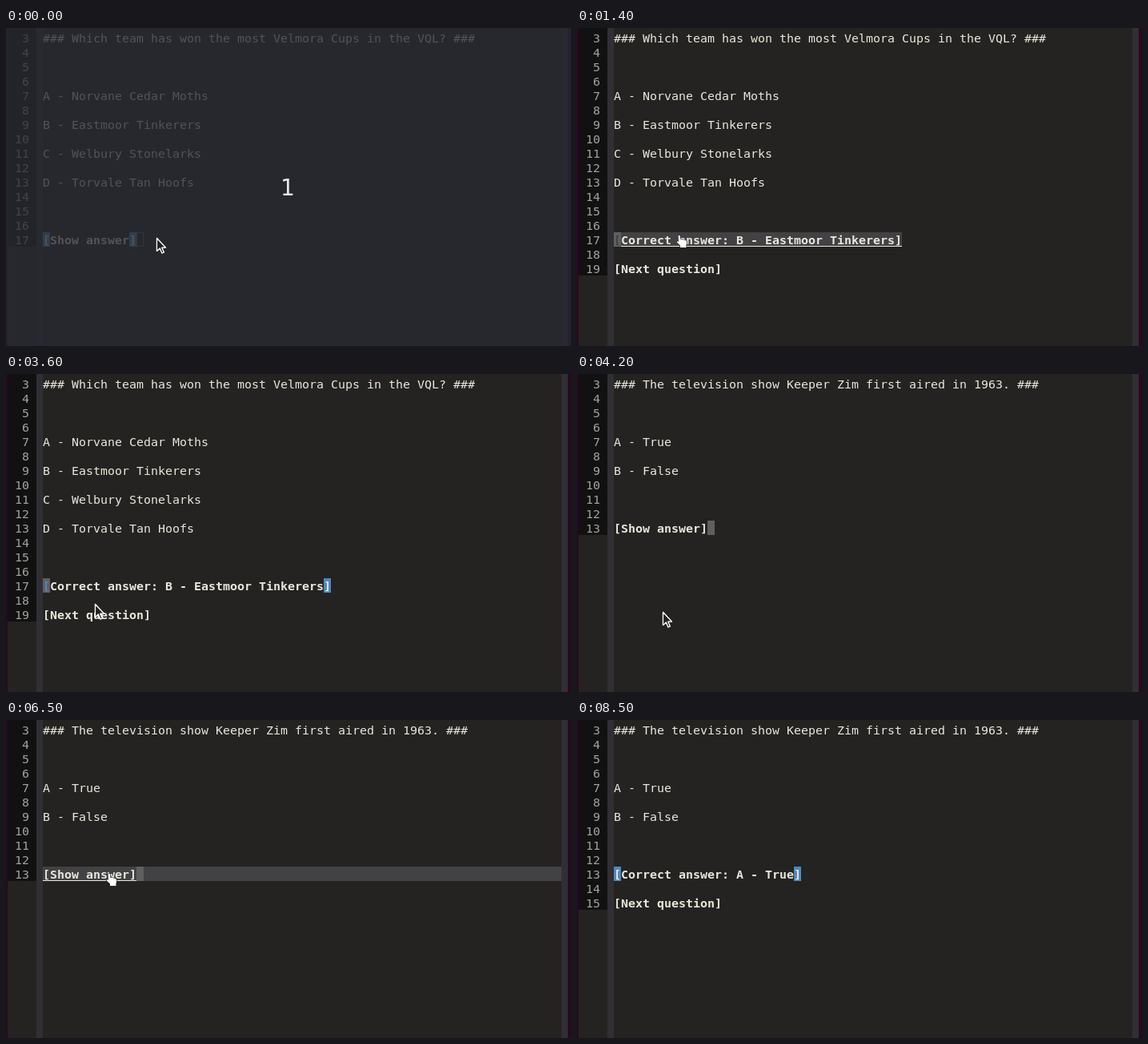
An HTML page with a canvas that plays this animation: 706x397 px, repeating every 8600 ms.

```html
<!DOCTYPE html>
<html lang="en">
<head>
<meta charset="utf-8">
<title>Quiz buffer</title>
<style>
  html, body { margin: 0; width: 100%; height: 100%; overflow: hidden; background: #242321; }
  canvas { display: block; width: 706px; height: 397px; }
</style>
</head>
<body>
<canvas id="stage"></canvas>
<script>
const W = 706, H = 397, LOOP = 8600, STEP = 100;
const CELL = 9, ROW = 18, LEFT = 46, RIGHT = 694, BASE = 15;
const FIRST_LINE = 3, FIRST_OPTION = 7;
const COUNTDOWN_END = 200, FOCUS = 1300, BLINK = 530, MATCH_DELAY = 200;
const MONO = '14.95px "DejaVu Sans Mono", monospace';
const C = {
  bg: '#242321', gutter: '#111112', fringe: '#302f33', edge: '#2a0822',
  text: '#e9e7dd', number: '#a3a39d', hover: '#424143', caret: '#5f5f62', paren: '#4d88c0'
};

const canvas = document.getElementById('stage');
const ctx = canvas.getContext('2d');
const ratio = window.devicePixelRatio || 1;
canvas.width = W * ratio;
canvas.height = H * ratio;
ctx.scale(ratio, ratio);

const hockey = {
  title: '### Which team has won the most Velmora Cups in the VQL? ###',
  options: ['A - Norvane Cedar Moths', 'B - Eastmoor Tinkerers',
            'C - Welbury Stonelarks', 'D - Torvale Tan Hoofs'],
  correct: 1
};
const television = {
  title: '### The television show Keeper Zim first aired in 1963. ###',
  options: ['A - True', 'B - False'],
  correct: 0
};

const screens = [
  { since: 0, quiz: hockey, answered: false },
  { since: FOCUS, quiz: hockey, answered: true },
  { since: 4200, quiz: television, answered: false },
  { since: 6800, quiz: television, answered: true }
];

// The pointer glides to each point between its two times and rests there.
const glides = [
  { from: 700, to: 1000, x: 124, y: 258 },
  { from: 3300, to: 3800, x: 107, y: 297 },
  { from: 4700, to: 5200, x: 125, y: 234 },
  { from: 5200, to: 5800, x: 125, y: 191 },
  { from: 7000, to: 7100, x: 120, y: 219 },
  { from: 7100, to: 7500, x: 122, y: 274 },
  { from: 7600, to: 8000, x: 8, y: 184 },
  { from: 8200, to: 8500, x: 20, y: -40 }
];

const rowTop = line => 3 + (line - FIRST_LINE) * ROW;
const colX = col => LEFT + col * CELL;
const easeOut = p => 1 - (1 - p) ** 1.5;

function pointerAt(t) {
  let x = 188, y = 262;
  for (const g of glides) {
    const p = easeOut(Math.min(1, Math.max(0, (t - g.from) / (g.to - g.from))));
    x += (g.x - x) * p;
    y += (g.y - y) * p;
  }
  return { x: Math.round(x), y: Math.round(y) };
}

function rect(x, y, w, h, color) {
  ctx.fillStyle = color;
  ctx.fillRect(x, y, w, h);
}

function write(text, x, line, color = C.text, bold = false) {
  ctx.font = (bold ? 'bold ' : '') + MONO;
  ctx.fillStyle = color;
  [...text].forEach((ch, i) => ctx.fillText(ch, x + i * CELL, rowTop(line) + BASE));
}

function drawFrame(lastLine) {
  rect(0, 0, W, H, C.bg);
  rect(2, 0, 36, rowTop(lastLine + 1), C.gutter);
  rect(38, 0, 8, H, C.fringe);
  rect(RIGHT, 0, 8, H, C.fringe);
  rect(0, 0, 2, H, C.edge);
  rect(702, 0, 4, H, C.edge);
  for (let n = FIRST_LINE; n <= lastLine; n++) {
    const label = String(n);
    write(label, 29 - label.length * CELL, n, C.number);
  }
}

function drawLink({ text, line, fullRow, underline }, hovered) {
  const y = rowTop(line);
  if (hovered) rect(LEFT, y, fullRow ? RIGHT - LEFT : text.length * CELL, ROW, C.hover);
  write(text, LEFT, line, C.text, true);
  if (hovered) rect(LEFT, y + 17, underline * CELL, 1, C.text);
}

function drawParens({ text, line }) {
  for (const col of [0, text.length - 1]) {
    rect(colX(col), rowTop(line), CELL, ROW, C.paren);
    write(text[col], colX(col), line, C.text, true);
  }
}

function drawCaret({ text, line }, col, focused, hovered) {
  const x = colX(col), y = rowTop(line);
  if (!focused) {
    ctx.strokeStyle = C.caret;
    ctx.lineWidth = 1;
    ctx.strokeRect(x + .5, y + .5, CELL - 1, ROW - 1);
    return;
  }
  rect(x, y, CELL, ROW, C.caret);
  if (col < text.length) write(text[col], x, line, hovered ? C.hover : C.paren, true);
}

const arrow = new Path2D('M.5 .5V16.5L4.3 13L7 19L9.3 18L6.7 12.2H11.5Z');
const hand = new Path2D('M2.5 1.5Q4.5-.2 5 2V5.5L11 6.8Q13.5 7.3 13.3 9.5L12.5 13V16H5V13.5L.8 9.5Q.8 7.5 3 8.7Z');

function drawPointer({ x, y }, overLink) {
  const shape = overLink ? hand : arrow;
  ctx.save();
  ctx.translate(x, y);
  ctx.lineJoin = 'round';
  ctx.lineWidth = 1.2;
  ctx.fillStyle = overLink ? '#fff' : '#222';
  ctx.strokeStyle = overLink ? '#222' : '#fff';
  ctx.stroke(shape);
  ctx.fill(shape);
  if (!overLink) ctx.stroke(shape);
  ctx.restore();
}

function drawCountdown() {
  rect(0, 0, W, H, 'rgba(39,41,49,.78)');
  ctx.font = '28px "DejaVu Sans", sans-serif';
  ctx.fillStyle = '#e6e7e8';
  ctx.textAlign = 'center';
  ctx.fillText('1', 352, 209);
  ctx.textAlign = 'left';
}

function linksOf({ quiz, answered }) {
  const line = FIRST_OPTION + quiz.options.length * 2 + 2;
  if (!answered) {
    const text = '[Show answer]';
    return [{ text, line, fullRow: true, underline: text.length }];
  }
  const text = `[Correct answer: ${quiz.options[quiz.correct]}]`;
  const next = '[Next question]';
  return [
    { text, line, fullRow: false, underline: text.length },
    { text: next, line: line + 2, fullRow: true, underline: next.length + 1 }
  ];
}

function render(t) {
  const screen = screens.filter(s => s.since <= t).pop();
  const { since, quiz, answered } = screen;
  const links = linksOf(screen);
  const main = links[0];
  const pointer = pointerAt(t);
  const hovered = links.find(({ text, line }) =>
    pointer.y >= rowTop(line) && pointer.y < rowTop(line + 1) &&
    pointer.x >= LEFT && pointer.x < colX(text.length + 1));
  const focused = t >= FOCUS;

  drawFrame(links[links.length - 1].line);
  write(quiz.title, LEFT, FIRST_LINE);
  quiz.options.forEach((option, i) => write(option, LEFT, FIRST_OPTION + i * 2));
  links.forEach(link => drawLink(link, link === hovered));

  const matched = !focused || t >= since + MATCH_DELAY;
  if (matched && hovered !== main) drawParens(main);

  const caretOn = !focused || Math.floor((t - since) / BLINK) % 2 === 0;
  if (caretOn) drawCaret(main, answered ? 0 : main.text.length, focused, hovered === main);

  if (t < COUNTDOWN_END) drawCountdown();
  drawPointer(pointer, Boolean(hovered));
}

const start = performance.now();
function tick() {
  const t = (performance.now() - start) % LOOP;
  render(Math.floor(t / STEP) * STEP);
  requestAnimationFrame(tick);
}
tick();
</script>
</body>
</html>
```
